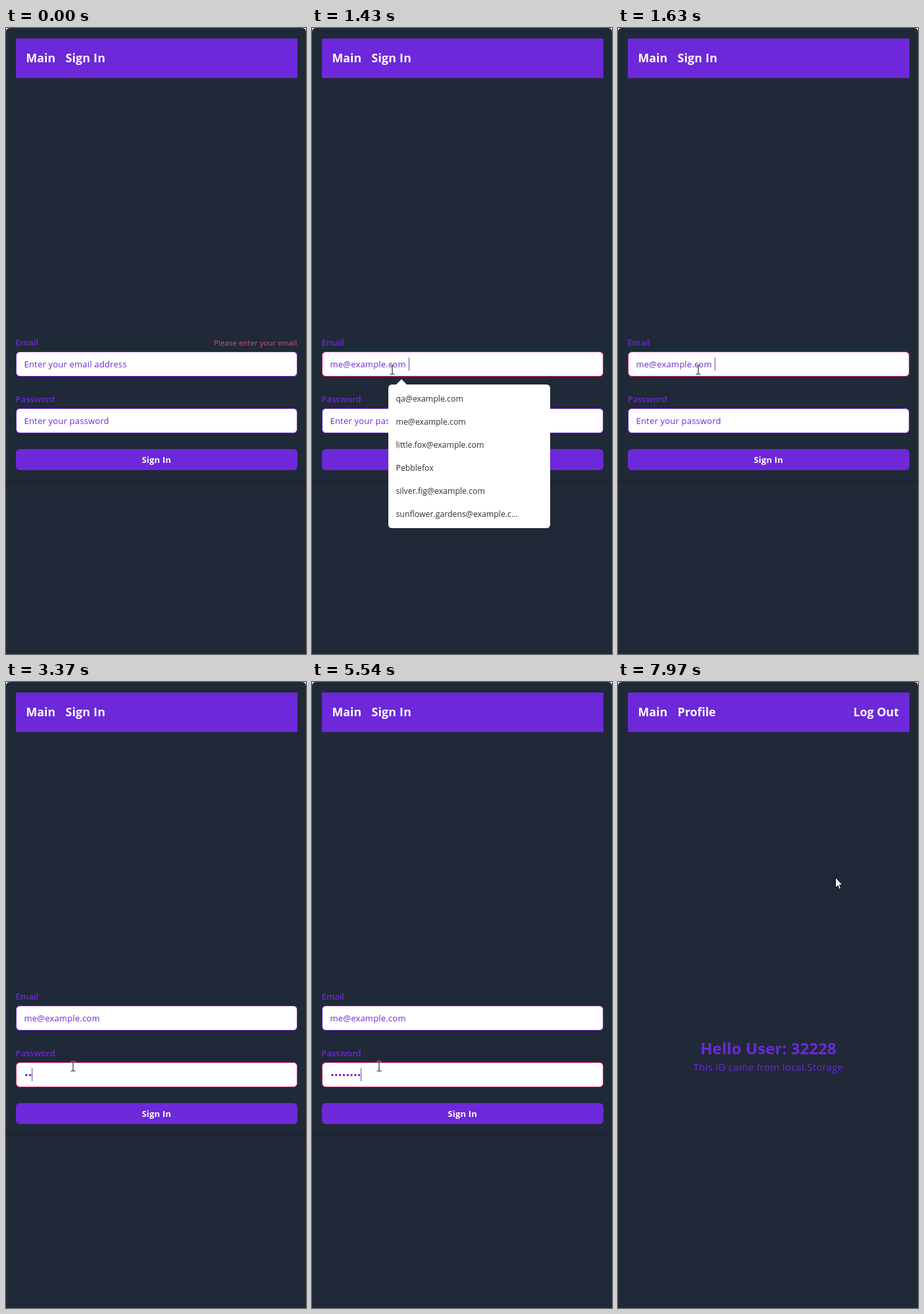
These frames come from a looping animation (456x950 px, 7990 ms). An HTML page:

```html
<!DOCTYPE html>
<html lang="en">
<head>
<meta charset="utf-8">
<title>Sign in form</title>
<style>
  :root { --violet: #6d28d9; --deep: #5b21b6; --pink: #db2777; }
  html, body { margin: 0; width: 100%; height: 100%; overflow: hidden; background: #fff; }
  svg { display: block; width: 100%; height: 100%; }
  text { font-family: "Open Sans", "Noto Sans", sans-serif; font-size: 13px; letter-spacing: .2px; fill: var(--violet); white-space: pre; }
  .nav { font-size: 17.8px; font-weight: 700; letter-spacing: 0; fill: #fff; }
  .label { font-weight: 600; letter-spacing: 0; }
  .error { font-size: 11px; letter-spacing: .24px; fill: #ec4899; text-anchor: end; }
  .cta { font-weight: 700; fill: #fff; text-anchor: middle; }
  .hello { font-size: 24px; font-weight: 700; letter-spacing: .1px; text-anchor: middle; }
  .note { font-size: 15px; letter-spacing: .25px; text-anchor: middle; }
  .menu text { font-size: 12.3px; font-weight: 500; letter-spacing: 0; fill: #2f2f33; }
  .field { fill: #fff; stroke: var(--violet); }
  .caret { stroke: var(--deep); }
  .dots { stroke: var(--violet); stroke-width: 3.6; stroke-linecap: round; stroke-dasharray: 0 5.83; }

  /* Every part shares one 7990 ms clock; most changes are hard cuts. */
  .a { animation: 7990ms step-end infinite; }

  .form { animation-name: form; }
  @keyframes form { 0% { visibility: visible } 86.73%, 100% { visibility: hidden } }
  .profile { animation-name: profile; }
  @keyframes profile { 0% { visibility: hidden } 86.73%, 100% { visibility: visible } }

  .before-fill { animation-name: before-fill; }
  @keyframes before-fill { 0% { opacity: 1 } 17.52%, 100% { opacity: 0 } }
  .after-fill { animation-name: after-fill; }
  @keyframes after-fill { 0% { opacity: 0 } 17.52%, 100% { opacity: 1 } }
  .email-field { animation-name: email-field; }
  @keyframes email-field {
    0% { stroke: var(--violet) } 13.26% { stroke: var(--pink) } 24.9%, 100% { stroke: var(--violet) }
  }
  .email-caret { animation-name: email-caret; }
  @keyframes email-caret {
    0% { opacity: 0; transform: translateX(28.5px) }
    13.26% { opacity: 1; transform: translateX(28.5px) }
    17.52% { opacity: 1; transform: translateX(147.5px) }
    24.9%, 100% { opacity: 0; transform: translateX(147.5px) }
  }

  .menu { opacity: 0; animation: menu 7990ms linear infinite; }
  @keyframes menu {
    0%, 14.01% { opacity: 0 } 15.26%, 18.02% { opacity: 1 } 19.77%, 100% { opacity: 0 }
  }

  .password-field { animation-name: password-field; }
  @keyframes password-field {
    0% { stroke: var(--violet) } 24.9% { stroke: var(--pink) } 82.6%, 100% { stroke: var(--violet) }
  }
  .hint { animation-name: hint; }
  @keyframes hint { 0% { opacity: 1 } 41.55%, 100% { opacity: 0 } }
  .pen { --step: 5.83px; animation-name: pen; }
  @keyframes pen {
    0% { transform: none }
    41.55% { transform: translateX(var(--step)) }
    42.17% { transform: translateX(calc(2 * var(--step))) }
    46.8% { transform: translateX(calc(3 * var(--step))) }
    49.06% { transform: translateX(calc(4 * var(--step))) }
    50.93% { transform: translateX(calc(5 * var(--step))) }
    66.2% { transform: translateX(calc(6 * var(--step))) }
    67.08% { transform: translateX(calc(7 * var(--step))) }
    69.33%, 100% { transform: translateX(calc(8 * var(--step))) }
  }
  .password-caret { animation-name: password-caret; }
  @keyframes password-caret {
    0%, 31.16%, 57.57%, 75.84%, 82.6%, 100% { opacity: 0 }
    24.9%, 37.67%, 63.82%, 82.1% { opacity: 1 }
  }

  .button { fill: var(--violet); animation-name: button; }
  @keyframes button {
    0%, 5.31% { fill: var(--violet) } 4.63%, 80.03%, 100% { fill: var(--deep) }
  }
  .ring { animation-name: ring; }
  @keyframes ring { 0% { opacity: 0 } 82.6%, 100% { opacity: 1 } }

  .cursor { animation: move 7990ms linear infinite; }
  @keyframes move {
    0%, .87% { transform: translate(380px, 920px) }
    3.12% { transform: translate(310px, 760px) }
    5% { transform: translate(248px, 650px) }
    6.5% { transform: translate(200px, 596px) }
    8.13% { transform: translate(145px, 548px) }
    9.76% { transform: translate(124px, 526px) }
    10.76%, 12.64% { transform: translate(122px, 523.5px) }
    13.26% { transform: translate(122px, 518.5px) }
    21.02% { transform: translate(122px, 518.5px); animation-timing-function: ease-in-out }
    25.65% { transform: translate(102px, 583.5px) }
    75.84% { transform: translate(102px, 583.5px); animation-timing-function: ease-in-out }
    82.6% { transform: translate(190px, 661px) }
    96.62% { transform: translate(190px, 661px) }
    97.4% { transform: translate(202px, 625px) }
    98.5% { transform: translate(255px, 490px) }
    99.74%, 100% { transform: translate(330px, 296px) }
  }
  .arrow { animation-name: arrow; }
  @keyframes arrow {
    0%, 4.63%, 5.98%, 9.51%, 24.59%, 80.03% { opacity: 0 }
    .87%, 5.31%, 7.14%, 22.32%, 78.84%, 86.73%, 100% { opacity: 1 }
  }
  .beam { animation-name: beam; }
  @keyframes beam {
    0%, 7.14%, 22.32%, 78.84%, 100% { opacity: 0 }
    5.98%, 9.51%, 24.59% { opacity: 1 }
  }
  .hand { animation-name: hand; }
  @keyframes hand {
    0%, 5.31%, 86.73%, 100% { opacity: 0 }
    4.63%, 80.03% { opacity: 1 }
  }
</style>
</head>
<body>
<svg viewBox="0 0 456 950" fill="none">
  <defs>
    <linearGradient id="shade" x2="0" y2="1">
      <stop stop-opacity=".16"/>
      <stop offset="1" stop-opacity="0"/>
    </linearGradient>
    <path id="ibeam" d="M-3.5-7H-1L0-6 1-7H3.5M0-6V6M-3.5 7H-1L0 6 1 7H3.5"/>
  </defs>

  <path fill="#202937" d="M0 950V6Q0 0 6 0H450Q456 0 456 6V950Z"/>
  <rect x="15" y="16" width="428" height="60" fill="#6d28d9"/>
  <text class="nav" x="30.5" y="52">Main</text>

  <g class="a form">
    <rect y="686" width="456" height="6" fill="url(#shade)"/>
    <text class="nav" x="90.5" y="52" style="letter-spacing:.2px">Sign In</text>

    <text class="label" x="14.5" y="482">Email</text>
    <text class="a error before-fill" x="442.5" y="482">Please enter your email</text>
    <rect class="a field email-field" x="15.5" y="491.5" width="427" height="37" rx="5.5"/>
    <text class="a before-fill" x="27.5" y="515">Enter your email address</text>
    <text class="a after-fill" x="27.5" y="515">me@example.com</text>
    <path class="a caret email-caret" d="M0 500V520"/>

    <text class="label" x="14.5" y="568">Password</text>
    <rect class="a field password-field" x="15.5" y="577.5" width="427" height="37" rx="5.5"/>
    <path class="dots" d="M30.9 596.5H72"/>
    <g class="a pen">
      <rect x="28" y="586" width="50" height="20" fill="#fff"/>
      <path class="a caret password-caret" d="M28 586V606"/>
    </g>
    <text class="a hint" x="27.5" y="601">Enter your password</text>

    <rect class="a ring" x="11" y="635" width="436" height="40" rx="10" fill="#5b21b6"/>
    <rect class="a button" x="15" y="639" width="428" height="32" rx="6"/>
    <text class="cta" x="228.7" y="660">Sign In</text>
  </g>

  <g class="menu">
    <path fill="#fff" d="M122 541H128L136 533 144 541H356Q362 541 362 547V753Q362 759 356 759H122Q116 759 116 753V547Q116 541 122 541Z"/>
    <text x="127.5" y="567">qa@example.com</text>
    <text x="127.5" y="602">me@example.com</text>
    <text x="127.5" y="637">little.fox@example.com</text>
    <text x="127.5" y="672">Pebblefox</text>
    <text x="127.5" y="707">silver.fig@example.com</text>
    <text x="127.5" y="742">sunflower.gardens@example.c...</text>
  </g>

  <g class="a profile">
    <text class="nav" x="90.5" y="52">Profile</text>
    <text class="nav" x="427" y="52" text-anchor="end">Log Out</text>
    <text class="hello" x="228.5" y="565">Hello User: 32228</text>
    <text class="note" x="228.5" y="590">This ID came from local.Storage</text>
  </g>

  <g class="cursor">
    <path class="a arrow" fill="#fff" stroke="#000" d="M.5.5V16.5L4 13 6.5 18.5 9 17.4 6.6 12H11.3Z"/>
    <g class="a beam">
      <use href="#ibeam" stroke="#fff" stroke-width="2.6" stroke-opacity=".7"/>
      <use href="#ibeam" stroke="#000"/>
    </g>
    <path class="a hand" fill="#fff" stroke="#000" stroke-linejoin="round" d="M-1.5 12V1.5Q0-1 1.5 1.5V8Q3 6 4.5 8.5 6 7 7.5 9.5 10 8.5 10.5 11V16L8.5 21.5H-.5L-5 14Q-5 11-1.5 14Z"/>
  </g>
</svg>
</body>
</html>
```
